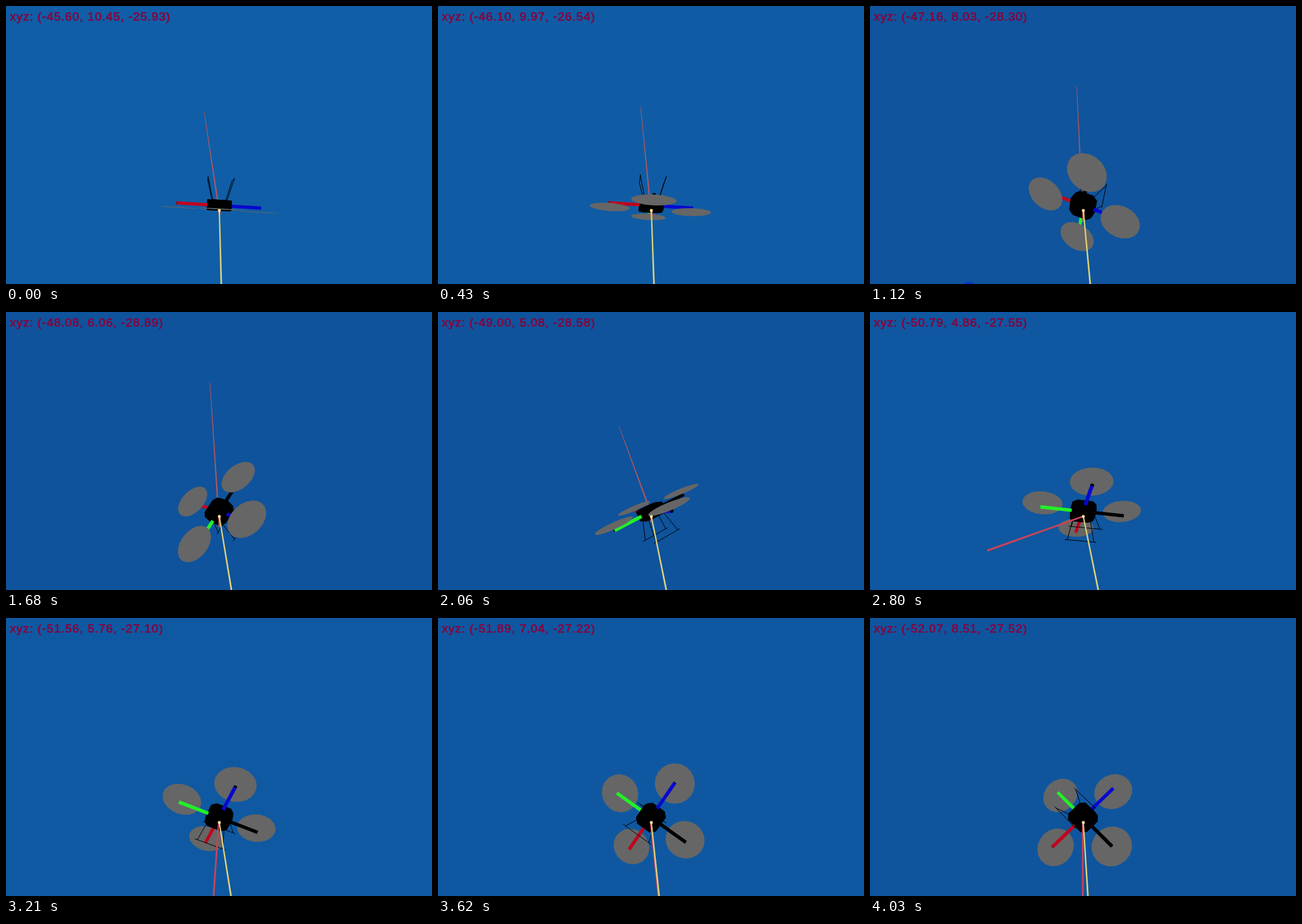
An HTML page with a canvas for the animation above (4080 ms loop, 671 px wide and 439 px high).

```html
<!DOCTYPE html>
<html lang="en">
<head>
<meta charset="utf-8">
<title>Quadcopter flip</title>
<style>
  html, body { margin: 0; width: 100%; height: 100%; overflow: hidden; }
  canvas { position: absolute; left: 0; top: 0; display: block; }
  #label {
    position: absolute; left: 6px; top: 6px;
    font: 19px/22px "Liberation Sans", Arial, sans-serif;
    letter-spacing: .9px; white-space: pre;
    color: #85053f; -webkit-text-stroke: .7px #85053f;
  }
</style>
</head>
<body>
<canvas id="stage" width="671" height="439"></canvas>
<div id="label"></div>
<script>
const ctx = document.getElementById('stage').getContext('2d');
const label = document.getElementById('label');
const LOOP = 4080, STEP = 46.5;
const CX = 335.5, CY = 315, DEPTH = 470;
const ARM = 67, ROTOR = 31, ROTOR_AT = 64, LIFT = 7;
const GREY = '#666666', BLACK = '#000';

// Key points of the flight, joined by smooth curves; angles in degrees.
const times = [205, 430, 1120, 1680, 2420, 3210, 4030];
const curves = {
  flip: [2, 12.7, 54.4, 129.6, 200, 228, 291],
  tilt: [-3.4, -2.9, -23.6, -32.7, -10, 8.6, 16.5],
  spin: [3, 3.8, 7.5, 39, 79.3, 69.2, 41.5],
  swing: [-9, -6, -3, -4, -51, -176, -180],
  reach: [149, 156, 188, 204, 100, 250, 250],
  x: [-45.6, -46.1, -47.16, -48.08, -49.94, -51.56, -52.07],
  y: [10.45, 9.97, 8.03, 6.06, 4.56, 5.76, 8.51],
  z: [-25.93, -26.54, -28.3, -28.89, -28.09, -27.1, -27.52]
};

function slope(keys, i) {
  const a = Math.max(i - 1, 0), b = Math.min(i + 1, keys.length - 1);
  return (keys[b] - keys[a]) / (times[b] - times[a]);
}

// Cubic Hermite between key i and the next.
function sample(keys, i, f) {
  const d = times[i + 1] - times[i], f2 = f * f, f3 = f2 * f, ease = 3 * f2 - 2 * f3;
  return keys[i] * (1 - ease) + keys[i + 1] * ease +
    d * (slope(keys, i) * (f3 - 2 * f2 + f) + slope(keys, i + 1) * (f3 - f2));
}

const rad = deg => deg * Math.PI / 180;
const bump = (t, mid, width) => Math.exp(-(((t - mid) / width) ** 2));

// Screen axes (x right, y down, z to the viewer) of blue arm, green arm and rotor side.
let U, V, N;

function setAxes(flip, tilt, spin) {
  const [cf, sf, ct, st, cs, ss] =
    [flip, tilt, spin].flatMap(a => [Math.cos(rad(a)), Math.sin(rad(a))]);
  const side = [ct, -st * cf, -st * sf], ahead = [0, sf, -cf];
  N = [st, ct * cf, ct * sf];
  U = side.map((c, j) => cs * c + ss * ahead[j]);
  V = side.map((c, j) => cs * ahead[j] - ss * c);
}

// Body coordinates to screen x, y and perspective scale.
function project(a, b, c) {
  const [x, y, z] = U.map((p, j) => p * a + V[j] * b + N[j] * c);
  const s = DEPTH / (DEPTH - z);
  return [CX + x * s, CY + y * s, s];
}

function fill(points, color) {
  ctx.fillStyle = color;
  ctx.beginPath();
  points.forEach(p => ctx.lineTo(p[0], p[1]));
  ctx.closePath();
  ctx.fill();
}

function line(p, q, width, color) {
  ctx.strokeStyle = color;
  ctx.lineWidth = width;
  ctx.beginPath();
  ctx.moveTo(p[0], p[1]);
  ctx.lineTo(q[0], q[1]);
  ctx.stroke();
}

// Straight ray whose width goes from w0 to w1.
function ray(p, q, w0, w1, color) {
  const dx = q[0] - p[0], dy = q[1] - p[1], len = Math.hypot(dx, dy) || 1;
  const nx = -dy / len / 2, ny = dx / len / 2;
  fill([[p[0] + nx * w0, p[1] + ny * w0], [q[0] + nx * w1, q[1] + ny * w1],
        [q[0] - nx * w1, q[1] - ny * w1], [p[0] - nx * w0, p[1] - ny * w0]], color);
}

function ring(count, place) {
  return Array.from({ length: count }, (_, i) => place(i / count * 2 * Math.PI, i));
}

// A square block with cut corners.
function drawBody() {
  const outline = c => ring(8, (_, i) => {
    const t = (i >> 1) * Math.PI / 2 + (i % 2 ? .56 : -.56);
    return project(22.3 * Math.cos(t), 22.3 * Math.sin(t), c);
  });
  const top = outline(8), base = outline(-8);
  fill(top, BLACK);
  fill(base, BLACK);
  top.forEach((p, i) => {
    const k = (i + 1) % 8;
    fill([p, top[k], base[k], base[i]], BLACK);
  });
}

function drawRotor(a, b, color) {
  const disc = () => fill(ring(20, t => project(
    a * ROTOR_AT + ROTOR * Math.cos(t), b * ROTOR_AT + ROTOR * Math.sin(t), LIFT)), GREY);
  const arm = () => {
    const p = project(a * 18, b * 18, 0), q = project(a * ARM, b * ARM, 0);
    ray(p, q, 5.4 * p[2], 5.4 * q[2], color);
    if (a * U[2] + b * V[2] > 0)
      fill(ring(10, t => {
        const w = 2.7 * Math.cos(t);
        return project(a * ARM - b * w, b * ARM + a * w, 2.7 * Math.sin(t));
      }), BLACK);
  };
  if (N[2] > 0) { arm(); disc(); } else { disc(); arm(); }
}

function drawSkids() {
  for (const side of [-1, 1]) {
    line(project(side * 20, -25, -42), project(side * 20, 25, -42), 1, BLACK);
    for (const end of [-1, 1])
      line(project(side * 11, end * 14, -8), project(side * 20, end * 21, -42), 1, BLACK);
  }
}

function drawCraft() {
  const arms = ['#0808d0', '#22f028', '#c0061e', BLACK].map((color, i) => {
    const a = [1, 0, -1, 0][i], b = [0, 1, 0, -1][i];
    return { z: a * U[2] + b * V[2], draw: () => drawRotor(a, b, color) };
  });
  const parts = [{ z: 0, draw: drawBody }, ...arms].sort((p, q) => p.z - q.z);
  if (N[2] > 0) drawSkids();
  parts.forEach(p => p.draw());
  if (N[2] <= 0) drawSkids();
}

function render(time) {
  const t = Math.min(Math.max(time, times[0]), times[6]);
  let i = 0;
  while (i < 5 && t >= times[i + 1]) i++;
  const span = times[i + 1] - times[i], steps = Math.round(span / STEP);
  const f = Math.floor((t - times[i]) / span * steps + .01) / steps;
  const now = times[i] + f * span;
  const at = name => sample(curves[name], i, f);

  setAxes(at('flip'), at('tilt'), at('spin'));

  const sky = Math.round(83 + 11 * bump(now, 205, 550) + 6 * bump(now, 3300, 750));
  ctx.fillStyle = `rgb(15,${sky},${sky + 73})`;
  ctx.fillRect(0, 0, 671, 439);

  // blue marker peeping in at the lower edge
  ctx.fillStyle = '#0a2fd0';
  ctx.beginPath();
  ctx.ellipse(156, 446 - 5 * bump(now, 1120, 200), 9, 5, 0, 0, 7);
  ctx.fill();

  const swing = rad(at('swing')), reach = at('reach');
  const tip = [CX + reach * Math.sin(swing), CY - reach * Math.cos(swing)];
  const near = tip[1] > CY;
  if (!near) ray([CX - 1, CY], tip, 2.4, .8, '#b0585f');
  drawCraft();
  if (near) ray([335, 323], tip, 2.4, 3.4, '#c84458');
  if (N[2] > 0) line([336, 324], [336.5, 329 + 16 * N[2]], 3.5, '#c8504c');

  const head = [336, 323], foot = 337.5 + 24 * bump(now, 2420, 1350);
  ray(head, [foot, 440], 2, 2.6, '#dfd27c');
  ctx.fillStyle = '#efe3a0';
  ctx.beginPath();
  ctx.arc(head[0], head[1], 2.4, 0, 7);
  ctx.fill();

  label.textContent = `xyz: (${['x', 'y', 'z'].map(n => at(n).toFixed(2)).join(', ')})`;
}

const start = performance.now();
function tick() {
  render((performance.now() - start) % LOOP);
  requestAnimationFrame(tick);
}
tick();
</script>
</body>
</html>
```
